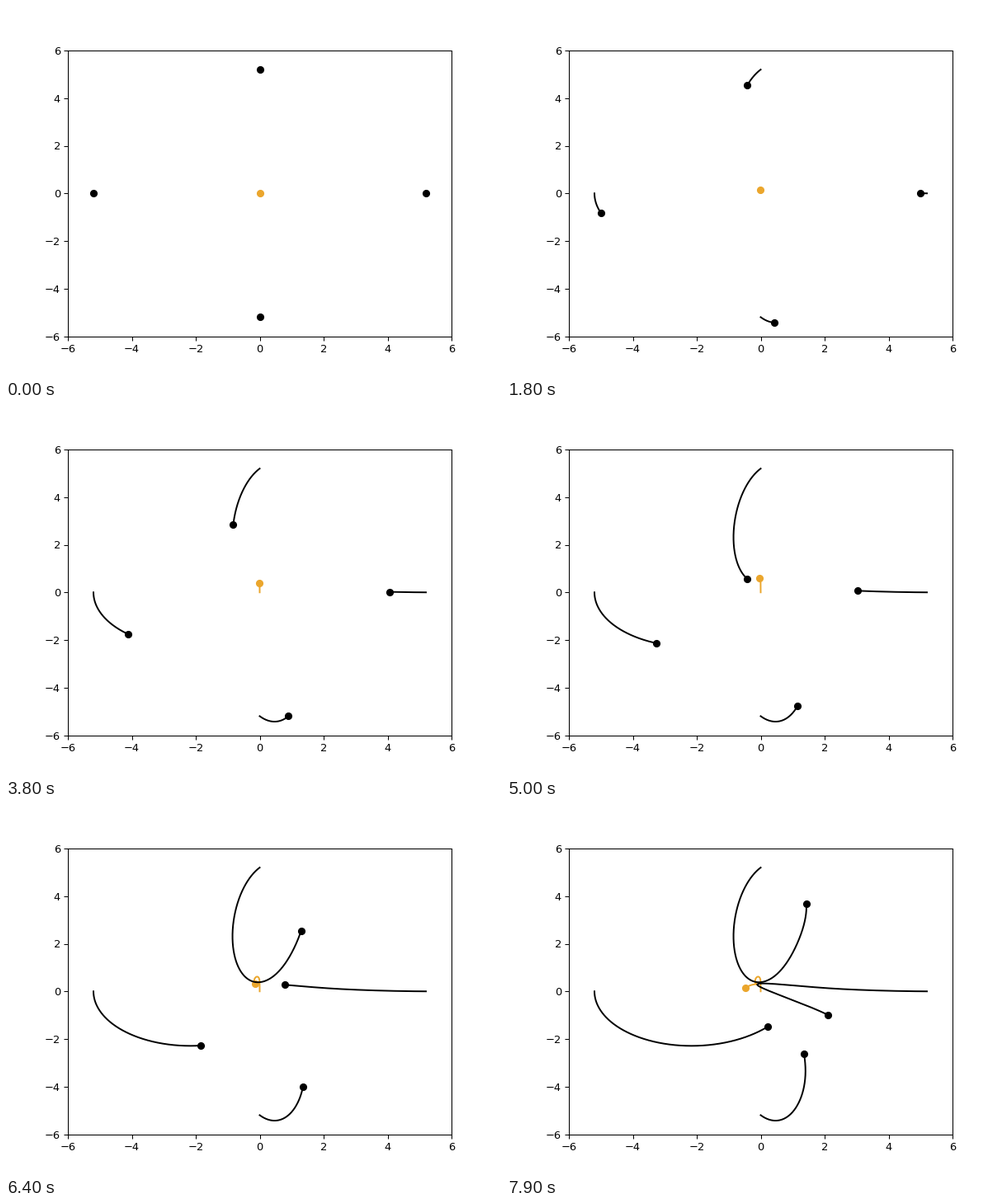
A matplotlib script that plays this animation: 600 px wide and 450 px high, repeating every 8000 ms.

```python
import numpy as np
import matplotlib.pyplot as plt
from matplotlib.animation import FuncAnimation

FRAMES, INTERVAL = 80, 100
LAG = 2                 # frames lost while the motion eases in
SAMPLES, STEPS = 40, 10  # stored points per frame, integration steps per point
RADIUS, MU, SPEED, MASS = 5.2, 0.0401, 0.0265, 0.0955  # per frame; star mass is 1


def acceleration(z):
    d = z - z[:, None]
    return (mu * d / (np.abs(d) + np.eye(len(z))) ** 3).sum(axis=1)


def simulate(z, v, points, h):
    """Leapfrog integration of complex positions; one row per stored point."""
    rows, a = [z], acceleration(z)
    for _ in range(points):
        for _ in range(STEPS):
            v = v + a * h / 2
            z = z + v * h
            a = acceleration(z)
            v = v + a * h / 2
        rows.append(z)
    return np.array(rows)


# Four planets on a cross, turning anticlockwise with a common downward drift;
# the star moves so that the total momentum is zero.
turn = 1j ** np.arange(4)
planet_v = SPEED * (1j * turn - 1j)
mu = MU * np.array([1] + [MASS] * 4)
z0 = np.append(0, RADIUS * turn)
v0 = np.append(-MASS * planet_v.sum(), planet_v)
paths = simulate(z0, v0, FRAMES * SAMPLES, 1 / (SAMPLES * STEPS))

fig, ax = plt.subplots(figsize=(6.4, 4.8), dpi=93.75)
ax.set(xlim=(-6, 6), ylim=(-6, 6))

bodies = []
for path, color in zip(paths.T, ["#eba62c"] + ["black"] * 4):
    trail, = ax.plot([], [], color=color, lw=1.5)
    dot, = ax.plot([], [], "o", color=color, ms=6)
    bodies.append((path, trail, dot))


def update(n):
    t = n - LAG * (1 - np.exp(-n / LAG))
    end = round(t * SAMPLES) + 1
    for path, trail, dot in bodies:
        trail.set_data(path[:end].real, path[:end].imag)
        dot.set_data(path[end - 1:end].real, path[end - 1:end].imag)
    return [artist for _, *pair in bodies for artist in pair]


anim = FuncAnimation(fig, update, frames=FRAMES, interval=INTERVAL, repeat=True)
plt.show()
```
